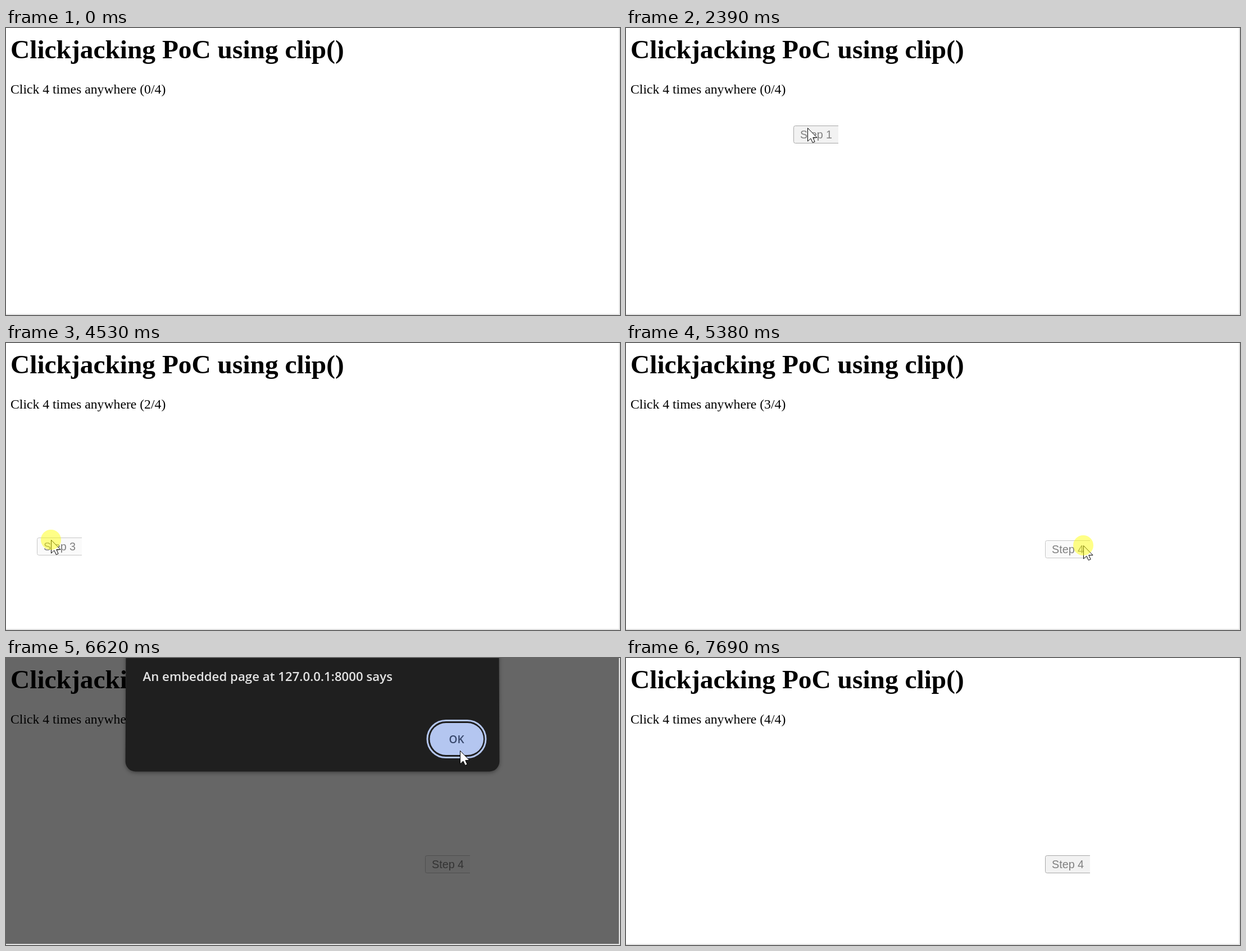
An HTML page with a canvas that plays this animation: 1093x512 px, repeating every 7720 ms.

```html
<!DOCTYPE html>
<html lang="en">
<head>
<meta charset="utf-8">
<title>Clickjacking PoC</title>
<style>
html, body { margin: 0; width: 100%; height: 100%; overflow: hidden; background: #fff; }
canvas { display: block; }
</style>
</head>
<body>
<canvas id="stage" width="1093" height="512"></canvas>
<script>
const W = 1093, H = 512, LOOP = 7720;
const ctx = document.getElementById('stage').getContext('2d');
const layer = document.createElement('canvas');
layer.width = W;
layer.height = H;
const dlg = layer.getContext('2d');

const SERIF = '"Liberation Serif", "Times New Roman", serif';
const SANS = '"Liberation Sans", Arial, sans-serif';
const UI = '"Open Sans", "Noto Sans", sans-serif';

// Pointer paths as Bezier points; "grip" is the pointer's place inside the button.
const moves = [
  { from: 1140, to: 1990, path: [[826, 511], [323, 178]], grip: [[25, 4], [25, 4]] },
  { from: 2490, to: 3130, path: [[323, 178], [540, 280], [782, 204]], grip: [[25, 4], [68, 9]] },
  { from: 3170, to: 3330, path: [[782, 204], [470, 280]], grip: [[68, 9], [41, 10]] },
  { from: 3330, to: 3410, path: [[470, 280], [558, 282]], grip: [[41, 10], [77, 13]] },
  { from: 3940, to: 4340, path: [[558, 282], [80, 351]], grip: [[77, 13], [25, 4]] },
  { from: 4600, to: 5110, path: [[80, 351], [420, 255], [640, 420], [814, 361]], grip: [[25, 4], [68, 9]] },
  { from: 6070, to: 6680, path: [[814, 361], [808, 160]] },
  { from: 6870, to: 7640, path: [[808, 160], [1004, 503]] }
];
const flashes = [[2420, 2490], [3710, 3800], [4530, 4600], [5380, 5450], [6690, 6770]];
const counted = [2460, 3770, 4590, 5450];
const POINTER_IN = 1140, POINTER_OUT = 7690;

const clamp = v => Math.min(1, Math.max(0, v));
const ramp = (t, a, b) => clamp((t - a) / (b - a));
const ease = u => u * u * (3 - 2 * u);
const within = (t, [a, b]) => t >= a && t < b;

function bezier(pts, u) {
  while (pts.length > 1) {
    pts = pts.slice(1).map((p, i) => p.map((v, k) => pts[i][k] + (v - pts[i][k]) * u));
  }
  return pts[0];
}

function pointerAt(t) {
  const m = moves.filter(m => t >= m.from).pop();
  return bezier(m.path, ease(ramp(t, m.from, m.to)));
}

function buttonAt(t) {
  const m = moves.filter(m => m.grip && t >= m.from).pop();
  const u = ease(ramp(t, m.from, m.to));
  const [x, y] = bezier(m.path, u), [gx, gy] = bezier(m.grip, u);
  return { x: Math.round(x - gx), y: Math.round(y - gy), loose: t < m.to };
}

function text(c, str, x, y, font, color, align = 'left') {
  c.font = font;
  c.fillStyle = color;
  c.textAlign = align;
  c.fillText(str, x, y);
}

function drawButton(t, step) {
  const { x, y, loose } = buttonAt(t);
  const pressed = flashes.slice(0, 4).some(f => within(t, f)) || within(t, [5380, 6740]);
  const [fill, edge] = pressed ? ['#fafafa', '#c6c6c6']
    : loose ? ['#f7f7f7', '#bababa'] : ['#f2f2f2', '#a7a7a7'];
  ctx.save();
  ctx.beginPath();
  ctx.rect(x, y, 80, 32);
  ctx.clip();
  ctx.beginPath();
  ctx.roundRect(x + 0.5, y + 0.5, 90, 31, 3);
  ctx.fillStyle = fill;
  ctx.fill();
  ctx.strokeStyle = edge;
  ctx.lineWidth = 1;
  ctx.stroke();
  text(ctx, 'Step ' + step, x + 12, y + 23, '19.75px ' + SANS, '#808080');
  ctx.restore();
}

function drawPage(t) {
  const count = counted.filter(c => t >= c).length;
  ctx.fillStyle = '#fff';
  ctx.fillRect(0, 0, W, H);
  text(ctx, 'Clickjacking PoC using clip()', 8, 54, 'bold 47.4px ' + SERIF, '#000');
  text(ctx, `Click 4 times anywhere (${count}/4)`, 8, 117, '23.7px ' + SERIF, '#000');
  if (t >= POINTER_IN) drawButton(t, Math.min(4, count + 1));
}

function drawFrame() {
  ctx.fillStyle = '#e2e2e2';
  ctx.fillRect(1091, 0, 2, H);
  ctx.fillRect(0, 510, W, 2);
}

// The dialog swings from its top edge, so its lower side spreads as it fades.
function drawDialog(t) {
  const p = t < 6790 ? ramp(t, 5450, 5600) : 1 - ramp(t, 6790, 6910);
  if (p <= 0) return;
  const dy = -21 * (1 - p), low = 202.5 + dy, spread = 1 + 7 * (1 - p);
  const mid = 545.5, top = 332, half = top + spread;

  dlg.clearRect(0, 0, W, H);
  dlg.save();
  dlg.shadowColor = 'rgba(0,0,0,.4)';
  dlg.shadowBlur = 7;
  dlg.shadowOffsetY = 2;
  dlg.fillStyle = '#1f1f1f';
  dlg.beginPath();
  dlg.moveTo(mid - top, -20);
  dlg.lineTo(mid + top, -20);
  dlg.arcTo(mid + half, low, mid, low, 18);
  dlg.arcTo(mid - half, low, mid - top, -20, 18);
  dlg.closePath();
  dlg.fill();
  dlg.restore();

  dlg.save();
  dlg.translate(0, dy);
  text(dlg, 'An embedded page at 127.0.0.1:8000 says', 243.5, 41, '600 22.25px ' + UI, '#e3e3e3');
  dlg.fillStyle = dlg.strokeStyle = '#b4c6f0';
  dlg.beginPath();
  dlg.roundRect(754.5, 116, 95.5, 57, 28.5);
  dlg.fill();
  if (t < 6690) {
    dlg.lineWidth = 3;
    dlg.beginPath();
    dlg.roundRect(750, 111.5, 104, 66, 33);
    dlg.stroke();
  }
  text(dlg, 'OK', 802, 152, '600 19px ' + UI, '#37476b', 'center');
  dlg.restore();

  ctx.globalAlpha = p;
  ctx.drawImage(layer, 0, 0);
  ctx.globalAlpha = 1;
}

function drawPointer(t) {
  if (!within(t, [POINTER_IN, POINTER_OUT])) return;
  const [x, y] = pointerAt(t);
  ctx.save();
  ctx.translate(Math.round(x) + 0.5, Math.round(y) + 0.5);
  ctx.beginPath();
  for (const [px, py] of [[0, 0], [0, 23.5], [5.3, 18.5], [8.8, 26], [12.6, 24.4], [9.3, 17], [16.5, 17]]) {
    ctx.lineTo(px, py);
  }
  ctx.closePath();
  ctx.fillStyle = '#fff';
  ctx.fill();
  ctx.strokeStyle = '#000';
  ctx.lineWidth = 1;
  ctx.stroke();
  ctx.restore();
  // The click highlight tints the pointer too.
  if (flashes.some(f => within(t, f))) {
    ctx.fillStyle = 'rgba(255,255,0,.47)';
    ctx.beginPath();
    ctx.arc(x, y, 18, 0, Math.PI * 2);
    ctx.fill();
  }
}

function draw(t) {
  drawPage(t);
  const shade = 0.6 * ramp(t, 5440, 5550) * (1 - ramp(t, 6740, 6825));
  ctx.fillStyle = `rgba(0,0,0,${shade})`;
  ctx.fillRect(0, 0, 1091, 510);
  drawFrame();
  drawDialog(t);
  drawPointer(t);
}

const start = performance.now();
function tick() {
  draw((performance.now() - start) % LOOP);
  requestAnimationFrame(tick);
}
tick();
</script>
</body>
</html>
```
